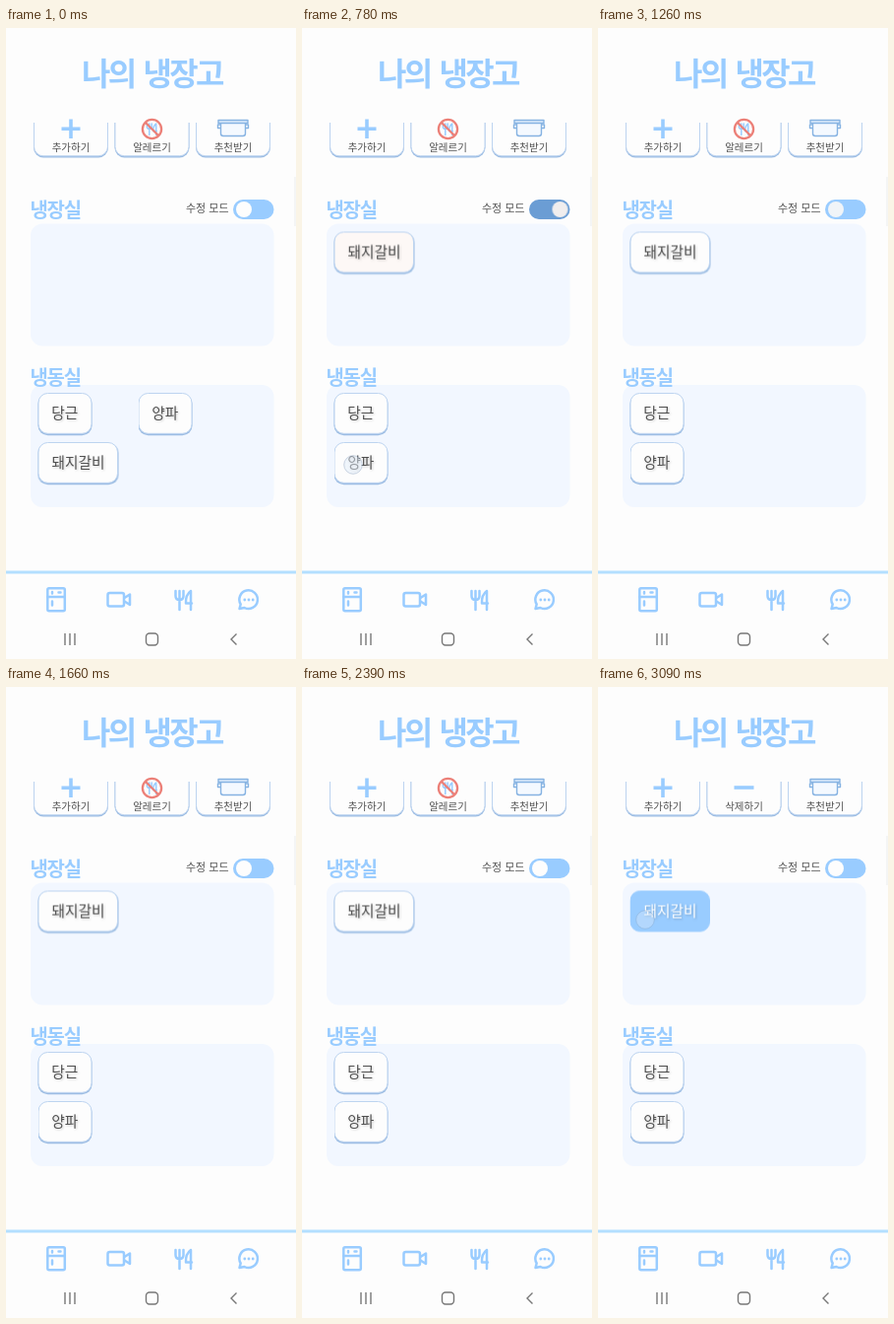
An HTML page for the animation above (3.16 s loop, 295 by 640 pixels).

```html
<!DOCTYPE html>
<html lang="ko">
<head>
<meta charset="utf-8">
<title>나의 냉장고</title>
<style>
  html, body { margin: 0; width: 100%; height: 100%; overflow: hidden; background: #fdfdfd; }
  svg { display: block; width: 100%; height: 100%; }
  text { font-family: "Noto Sans CJK KR", "Noto Sans CJK", "Noto Sans CJK JP", sans-serif; fill: #505050; }
  .title, .head { fill: #9cf; font-weight: 700; }
  .title { font-size: 32px; letter-spacing: -2.7px; word-spacing: 2.8px; }
  .head { font-size: 20px; letter-spacing: -1.3px; }
  .label { font-size: 10.5px; text-anchor: middle; }
  .mode { font-size: 11px; }
  .food text { font-size: 14.7px; text-anchor: middle; filter: drop-shadow(1.5px 1.5px 1px rgba(0, 0, 0, .2)); }
  .panel { fill: #f2f7ff; }
  .edge { fill: #9dbde3; }
  .face { fill: #fdfdfd; stroke: #bdd4f0; }
  .line { fill: none; stroke: #9cf; stroke-width: 2.5; stroke-linecap: round; stroke-linejoin: round; }
  .sys { fill: none; stroke: #777; stroke-width: 1.4; }
  .touch { fill: rgba(225, 235, 248, .65); stroke: rgba(120, 145, 180, .5); }

  .anim { animation: 3160ms step-end infinite; }
  .track { fill: #9cf; animation-name: track; animation-timing-function: linear; }
  .knob { fill: #fdfdfd; animation-name: knob; animation-timing-function: ease-in-out; }
  .finger { animation-name: finger; }
  .onion { animation-name: onion; }
  .pork { animation-name: pork; }
  .pork .face { animation-name: porkFace; }
  .pork .edge { animation-name: hide; }
  .pork text { animation-name: porkText; }
  .allergy { animation-name: hide; }
  .remove { animation-name: show; }

  @keyframes track {
    0%, 15.2% { fill: #9cf; }
    17.1%, 37% { fill: #6b9dd4; }
    39%, 100% { fill: #9cf; }
  }
  @keyframes knob {
    0%, 15.2% { transform: none; fill: #fdfdfd; }
    17.1%, 37% { transform: translateX(20.5px); fill: #f1eeee; }
    39% { transform: none; fill: #f0f4f8; }
    46%, 100% { transform: none; fill: #fdfdfd; }
  }
  @keyframes finger {
    0% { transform: translate(248px, 190.5px); opacity: 0; }
    11.7% { transform: translate(248px, 190.5px); opacity: 1; }
    15.5% { transform: translate(52px, 443px); opacity: 0; }
    20.3% { transform: translate(52px, 443px); opacity: .75; }
    26.3% { transform: translate(248px, 190.5px); opacity: 0; }
    34.2% { transform: translate(248px, 190.5px); opacity: 1; }
    38.3% { transform: translate(48px, 236px); opacity: 0; }
    79.1%, 100% { transform: translate(48px, 236px); opacity: .55; }
  }
  @keyframes onion {
    0% { transform: translate(134.5px, 370px); }
    23.7%, 100% { transform: translate(32.5px, 420px); }
  }
  @keyframes pork {
    0% { transform: translate(32.5px, 420px); }
    23.7%, 100% { transform: translate(32.5px, 206.5px); }
  }
  @keyframes porkFace {
    0% { fill: #fdfdfd; stroke: #bdd4f0; }
    23.7% { fill: #fdf8f6; stroke: #bdd4f0; }
    28.5% { fill: #fdfdfd; stroke: #bdd4f0; }
    83.9%, 100% { fill: #9cf; stroke: #9cf; }
  }
  @keyframes porkText {
    0% { fill: #505050; }
    83.9%, 100% { fill: #fff; }
  }
  @keyframes hide {
    0% { opacity: 1; }
    83.9%, 100% { opacity: 0; }
  }
  @keyframes show {
    0% { opacity: 0; }
    83.9%, 100% { opacity: 1; }
  }
</style>
</head>
<body>
<svg viewBox="0 0 295 640">
  <defs>
    <clipPath id="scroll"><rect y="96" width="295" height="60"/></clipPath>
    <g id="button">
      <rect class="edge" y="70" width="76" height="61.5" rx="10"/>
      <rect class="face" x=".5" y="69.5" width="75" height="60.3" rx="9.5"/>
    </g>
    <g id="small">
      <rect class="edge" y="1" width="55" height="42.3" rx="10"/>
      <rect class="face" x=".5" y=".5" width="54" height="40.8" rx="9.5"/>
    </g>
    <g id="cutlery">
      <path d="M-8.500-9v5q0 4 4 4t4-4v-5M-4.500-9V10"/>
      <path d="M7 10V-9Q1.500-5 2 3.500h6"/>
    </g>
  </defs>

  <rect width="295" height="640" fill="#fdfdfd"/>
  <rect x="293" y="151" width="2" height="50" fill="#f4f5f5"/>
  <text class="title" x="77" y="58">나의 냉장고</text>

  <g clip-path="url(#scroll)">
    <use href="#button" x="28"/>
    <use href="#button" x="110.5"/>
    <use href="#button" x="193"/>
  </g>

  <path d="M56.500 102.300h19M66 92.500v19.500" fill="none" stroke="#9cf" stroke-width="3.600"/>
  <text class="label" x="66" y="125">추가하기</text>

  <g class="anim allergy">
    <use href="#cutlery" class="line" transform="translate(148.500 102.500) scale(.6)"/>
    <g fill="none" stroke="#ec8078" stroke-width="2.300">
      <circle cx="148.500" cy="102.500" r="9.600"/>
      <path d="M142 96l13 13"/>
    </g>
    <text class="label" x="148.500" y="125">알레르기</text>
  </g>
  <g class="anim remove">
    <path d="M138.500 102h20" stroke="#9cf" stroke-width="3.600"/>
    <text class="label" x="148.500" y="125">삭제하기</text>
  </g>

  <g fill="none" stroke="#86b3e2" stroke-width="1.400" stroke-linejoin="round">
    <path d="M218.500 96.500v10.500q0 2.500 2.500 2.500h20q2.500 0 2.500-2.500V96.500" fill="#f4f9ff"/>
    <path d="M218 98h-2.500v3.500h2.500M244 98h2.500v3.500h-2.500"/>
    <path d="M216 93.500h30v3h-30z" fill="#dcebfb"/>
  </g>
  <text class="label" x="231" y="125">추천받기</text>

  <text class="head" x="24.5" y="191.5">냉장실</text>
  <text class="mode" x="183" y="187">수정 모드</text>
  <rect class="anim track" x="231" y="174" width="41.5" height="20" rx="10"/>
  <circle class="anim knob" cx="242" cy="184" r="8"/>

  <rect class="panel" x="25" y="198.5" width="247.5" height="124" rx="12"/>
  <rect class="panel" x="25" y="362" width="247.5" height="124" rx="12"/>
  <text class="head" x="24.5" y="361.5">냉동실</text>

  <g class="food" transform="translate(32.5 370)">
    <use href="#small"/>
    <text x="27.2" y="25.5">당근</text>
  </g>
  <g class="food anim onion">
    <use href="#small"/>
    <text x="27.2" y="25.5">양파</text>
  </g>
  <g class="food anim pork">
    <rect class="anim edge" y="1" width="82" height="42.3" rx="10"/>
    <rect class="anim face" x=".5" y=".5" width="80.5" height="40.8" rx="9.5"/>
    <text class="anim" x="41" y="25.5">돼지갈비</text>
  </g>

  <rect y="550.5" width="295" height="3" fill="#b3dfff"/>
  <g class="line">
    <rect x="42.300" y="568.300" width="17.500" height="23" rx="1.500"/>
    <path d="M42.300 577h17.500M47 572v1.500M47 581.500v4M53.500 572.500h2"/>
    <rect x="103.500" y="573" width="16.500" height="13.500" rx="2"/>
    <path d="M120.500 578l5.500-3.500v10.500l-5.500-3.500"/>
    <use href="#cutlery" x="181" y="580"/>
    <path d="M237.500 589l1.200-4.500a9.300 9.300 0 1 1 3.800 3.500z"/>
  </g>
  <g fill="#9cf">
    <circle cx="242.800" cy="580" r="1.400"/>
    <circle cx="247" cy="580" r="1.400"/>
    <circle cx="251.200" cy="580" r="1.400"/>
  </g>
  <g class="sys">
    <path d="M60 614v12M65 614v12M70 614v12"/>
    <rect x="142.500" y="614" width="12" height="12" rx="3.500"/>
    <path d="M234.500 614.500l-5.500 5.500 5.500 5.500"/>
  </g>

  <g class="anim finger"><circle class="touch" r="9.3"/></g>
</svg>
</body>
</html>
```
